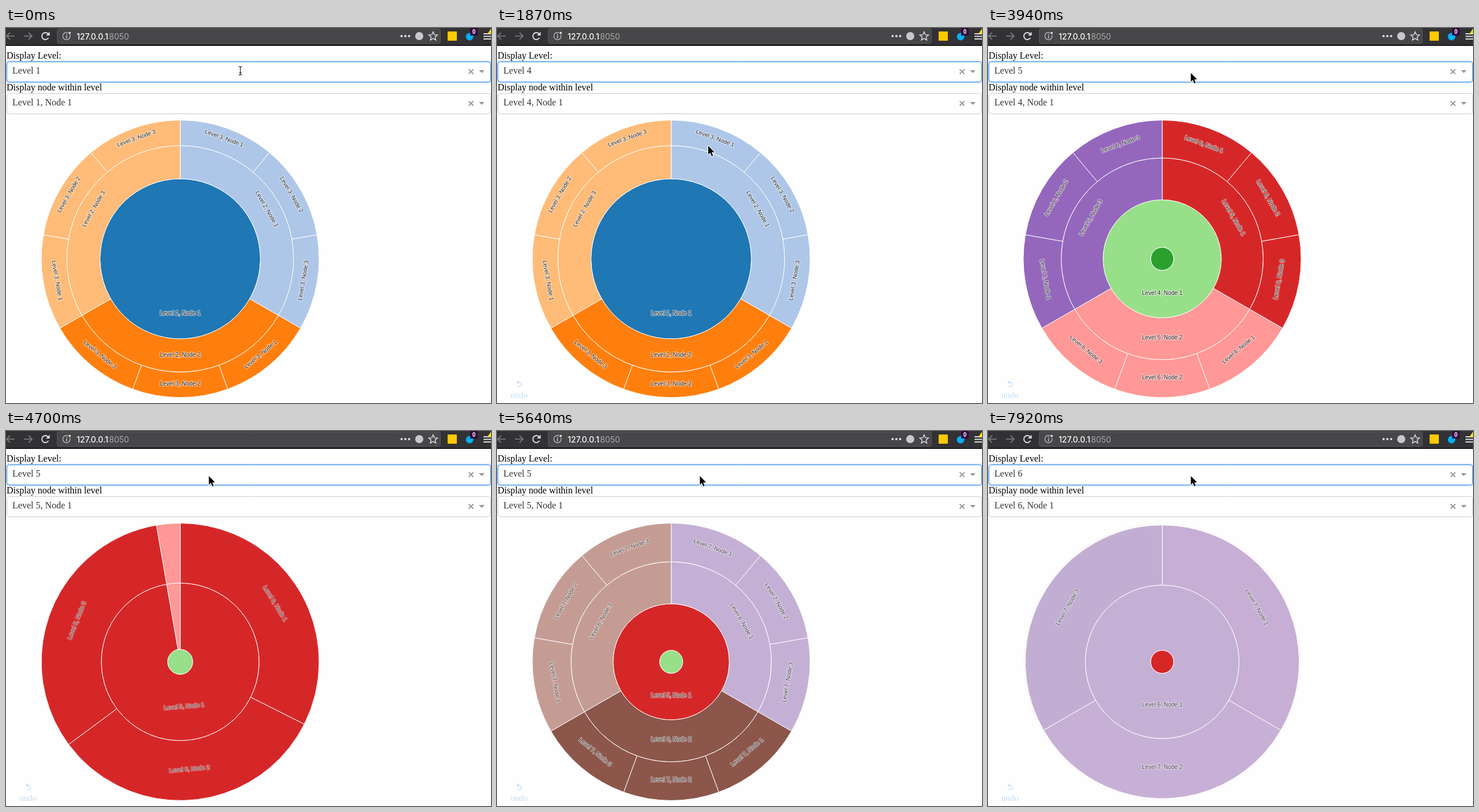
An HTML page with a canvas for the animation above (8000 ms loop, 838x649 px).

```html
<!DOCTYPE html>
<html lang="en">
<head>
<meta charset="utf-8">
<title>Sunburst levels</title>
<style>
  html, body { margin: 0; width: 100%; height: 100%; overflow: hidden; background: #fefefe; }
  canvas { display: block; }
</style>
</head>
<body>
<canvas id="stage" width="838" height="649"></canvas>
<script>
const ctx = document.getElementById('stage').getContext('2d');
const LOOP = 8000, TAU = Math.PI * 2;
const CX = 301, CY = 399.5, RADIUS = 240;
const SERIF = '"Liberation Serif", Times, serif';
const SANS = '"Liberation Sans", Arial, sans-serif';

// Own colours of the first three nodes of each level
const COLORS = {
  1: ['#1f77b4'],
  2: ['#aec7e8', '#ff7f0e', '#ffbb78'],
  3: ['#2ca02c'],
  4: ['#98df8a'],
  5: ['#d62728', '#ff9896', '#9467bd'],
  6: ['#c5b0d5', '#8c564b', '#c49c94'],
  7: ['#e377c2', '#f7b6d2', '#7f7f7f']
};

const mix = (a, b, e) => a + (b - a) * e;
const clamp = (v, lo, hi) => Math.max(lo, Math.min(hi, v));
const cubic = p => p < 0.5 ? 4 * p ** 3 : 1 - 4 * (1 - p) ** 3;
const zoom = (t, start) => cubic(clamp((t - start) / 750, 0, 1));
// Value of the last [time, value] step that has been reached
const pick = (t, steps) => steps.filter(s => t >= s[0]).pop()[1];

function mixColor(a, b, e) {
  const part = (c, i) => parseInt(c.slice(1 + 2 * i, 3 + 2 * i), 16);
  return `rgb(${[0, 1, 2].map(i => Math.round(mix(part(a, i), part(b, i), e)))})`;
}

function text(str, x, y, font, color, align = 'left') {
  ctx.font = font;
  ctx.fillStyle = color;
  ctx.textAlign = align;
  ctx.fillText(str, x, y);
}

function rect(x, y, w, h, color) {
  ctx.fillStyle = color;
  ctx.fillRect(x, y, w, h);
}

function shape(x, y, w, h, radius, fill, stroke) {
  ctx.beginPath();
  ctx.roundRect(x, y, w, h, radius);
  if (fill) { ctx.fillStyle = fill; ctx.fill(); }
  if (stroke) { ctx.strokeStyle = stroke; ctx.lineWidth = 1; ctx.stroke(); }
}

function disc(x, y, r, color) {
  ctx.beginPath();
  ctx.arc(x, y, r, 0, TAU);
  ctx.fillStyle = color;
  ctx.fill();
}

function trace(points, close) {
  ctx.beginPath();
  points.forEach(([x, y]) => ctx.lineTo(x, y));
  if (close) ctx.closePath();
}

function line(points, color, width) {
  trace(points);
  ctx.strokeStyle = color;
  ctx.lineWidth = width;
  ctx.stroke();
}

// ---- Browser bar ----
function drawToolbar() {
  rect(0, 0, 838, 31, '#323234');
  rect(0, 29.5, 838, 1.5, '#0e0e10');
  shape(88.5, 1.5, 662, 25, 3, '#474749', '#5a5a5c');
  const dim = '#77777a', light = '#dcdcde';
  line([[15, 14], [1, 14]], dim, 1.8);
  line([[7, 8], [1, 14], [7, 20]], dim, 1.8);
  line([[31, 14], [45, 14]], dim, 1.8);
  line([[39, 8], [45, 14], [39, 20]], dim, 1.8);

  ctx.beginPath();
  ctx.arc(68, 14, 6, 0.5, TAU - 0.7);
  ctx.strokeStyle = light;
  ctx.lineWidth = 2;
  ctx.stroke();
  trace([[75.5, 6.5], [75.5, 13], [69, 13]], true);
  ctx.fillStyle = light;
  ctx.fill();

  ctx.beginPath();
  ctx.arc(104.5, 14, 6.3, 0, TAU);
  ctx.strokeStyle = '#c4c4c6';
  ctx.lineWidth = 1.2;
  ctx.stroke();
  rect(103.8, 13, 1.6, 5, '#c4c4c6');
  rect(103.8, 10, 1.6, 1.8, '#c4c4c6');
  disc(110, 8.5, 3, '#474749');
  disc(110, 8.5, 2, light);

  text('127.0.0.1', 122, 20, '500 14px Inter, sans-serif', '#f9f9fa');
  text(':8050', 174, 20, '14px Inter, sans-serif', '#a9a9ab');

  [683.5, 690, 696.5].forEach(x => disc(x, 14, 2, light));
  disc(714, 14, 7, '#c8c8ca');
  const star = Array.from({ length: 10 }, (_, i) => {
    const a = i * Math.PI / 5, r = i % 2 ? 3.6 : 8;
    return [738 + r * Math.sin(a), 14.5 - r * Math.cos(a)];
  });
  trace(star, true);
  ctx.strokeStyle = light;
  ctx.lineWidth = 1.4;
  ctx.stroke();

  shape(763, 6, 16, 16, 1, '#ffc800');
  disc(801, 15, 6.5, '#00aef0');
  shape(802, 0, 13, 13, 1, '#33063f');
  text('0', 808.5, 10, `bold 10px ${SANS}`, '#fff', 'center');
  [9, 13.5, 18].forEach(y => rect(825, y, 13, 2, light));
  trace([[838, 1], [838, 10], [832, 10]], true);
  ctx.fillStyle = '#ffe000';
  ctx.fill();
}

// ---- Form ----
function drawControl(top, value, focused, open) {
  if (focused) shape(-1, top - 3, 841, 42, 6, 'rgba(0,126,255,.1)');
  shape(1.5, top + 0.5, 836, 35, open ? [4, 4, 0, 0] : 4, '#fff', focused ? '#1079e6' : '#ccc');
  text(value, 11, top + 21, `16px ${SERIF}`, '#333');
  const y = top + 17.5;
  line([[799.5, y - 4], [807.5, y + 4]], '#999', 2);
  line([[807.5, y - 4], [799.5, y + 4]], '#999', 2);
  const d = open ? -2.5 : 2.5;
  trace([[817, y - d], [827, y - d], [822, y + d]], true);
  ctx.fillStyle = '#999';
  ctx.fill();
}

function drawMenu({ selected, active, scroll }) {
  shape(1.5, 93.5, 836, 199, [0, 0, 4, 4], '#fff', '#ccc');
  rect(2, 93, 835, 1, '#e6e6e6');
  ctx.save();
  ctx.beginPath();
  ctx.rect(2, 94, 835, 198);
  ctx.clip();
  for (let level = 1; level <= 10; level++) {
    const y = 94 + (level - 1) * 35 - scroll;
    if (level === active) rect(2, y, 820, 35, '#e5f2ff');
    text(`Level ${level}`, 10, y + 22, `${level === selected ? 'bold ' : ''}16px ${SERIF}`, '#000');
  }
  rect(822, 94, 15, 198, '#fafafa');
  rect(822, 94, 1, 198, '#e4e4e4');
  shape(826, 95 + scroll * 200 / 350, 8, 114, 4, '#c2c2c2');
  ctx.restore();
}

function menuAt(t, mouse) {
  if (t >= 120 && t < 1870) {
    return { selected: 1, active: clamp(Math.floor((mouse.y - 94) / 35) + 1, 1, 6), scroll: 0 };
  }
  if (t >= 3250 && t < 3940) return { selected: 4, active: t < 3670 ? 4 : 5, scroll: 0 };
  if (t >= 6120 && t < 6900) {
    const down = t >= 6420;
    return { selected: 5, active: down ? 6 : 5, scroll: down ? 10 : 0 };
  }
  return null;
}

function drawUndo() {
  const color = '#c6ddf5';
  ctx.beginPath();
  ctx.arc(38.5, 617, 3.7, -Math.PI / 2, Math.PI * 0.75);
  ctx.strokeStyle = color;
  ctx.lineWidth = 1.4;
  ctx.stroke();
  line([[39, 613.3], [35, 613.3]], color, 1.4);
  line([[37.5, 610.8], [34.8, 613.3], [37.5, 616]], color, 1.4);
  text('undo', 38, 640, `15px ${SERIF}`, color, 'center');
}

// ---- Sunburst ----
// The chart stands still during these spans
const HOLDS = [[4000, 4210], [4270, 4560], [5320, 5410], [6900, 7050], [7310, 7490], [7600, 7810]];

function viewAt(time) {
  if (time < 2050) {
    return {
      base: 1, first: 1, last: 3, focus: 1, inner: 0, low: 0, span: 1,
      edge: k => k / 3, alive: k => k <= 3 ? 1 : 0
    };
  }
  const hold = HOLDS.find(([a, b]) => time >= a && time < b);
  const t = hold ? hold[0] : time;
  const zoom5 = zoom(t, 4065), grow7 = zoom(t, 4880);
  const zoom6 = zoom(t, 6950), grow8 = zoom(t, 7762);
  const part = (k, n) => Math.min(1, k / n);
  const edge = k => mix(mix(part(k, 6), part(k, 7), grow7), part(k, 8), grow8);
  return {
    base: 4, first: 3, last: 8, inner: 20, edge,
    focus: pick(time, [[0, 4], [4210, 5], [7050, 6]]),
    low: mix(mix(edge(3), edge(4), zoom5), edge(5), zoom6),
    span: mix(mix(1, 1 / 3, zoom5), 1 / 9, zoom6),
    alive: k => k <= 6 ? 1 : k === 7 ? grow7 : k === 8 ? grow8 : 0
  };
}

function drawArc(r0, r1, a0, a1, fill) {
  const turn = -Math.PI / 2;
  ctx.beginPath();
  if (a1 - a0 > TAU - 1e-6) {
    ctx.arc(CX, CY, r1, 0, TAU);
    if (r0 > 0) {
      ctx.moveTo(CX + r0, CY);
      ctx.arc(CX, CY, r0, 0, TAU, true);
    }
  } else {
    ctx.arc(CX, CY, r1, a0 + turn, a1 + turn);
    ctx.arc(CX, CY, r0, a1 + turn, a0 + turn, true);
    ctx.closePath();
  }
  ctx.fillStyle = fill;
  ctx.fill();
  ctx.strokeStyle = '#fff';
  ctx.lineWidth = 1;
  ctx.stroke();
}

function drawLabel(str, angle, r, alpha) {
  const flipped = Math.cos(angle) < -1e-6;
  ctx.save();
  ctx.globalAlpha = alpha;
  ctx.translate(CX + r * Math.sin(angle), CY - r * Math.cos(angle));
  ctx.rotate(flipped ? angle + Math.PI : angle);
  ctx.font = `10px ${SANS}`;
  ctx.textAlign = 'center';
  ctx.lineJoin = 'round';
  ctx.strokeStyle = 'rgba(255,255,255,.5)';
  ctx.lineWidth = 2;
  ctx.shadowColor = 'rgba(255,255,255,.8)';
  ctx.shadowBlur = 2;
  ctx.strokeText(str, 0, 0);
  ctx.shadowBlur = 0;
  ctx.fillStyle = '#222';
  ctx.fillText(str, 0, 0);
  ctx.restore();
}

function drawChart(t) {
  const v = viewAt(t);
  const low = Math.sqrt(v.low);
  const radius = y => Math.max(0, v.inner + (RADIUS - v.inner) * (Math.sqrt(y) - low) / (1 - low));
  const angle = x => clamp(x / v.span, 0, 1) * TAU;
  const ink = pick(t, [[0, 1], [4210, 0.72], [5640, 0.85], [5940, 1], [7050, 0.8]]);
  const labels = [];

  for (let k = v.first; k <= v.last; k++) {
    const alpha = v.alive(k);
    const y0 = v.edge(k - 1), y1 = v.edge(k);
    const r0 = radius(y0), r1 = radius(y1);
    if (!alpha || r1 < 0.5) continue;
    const depth = Math.max(0, k - v.base), width = 3 ** -depth;
    for (let i = 0; i < Math.min(9, 3 ** depth); i++) {
      const a0 = angle(i * width), a1 = angle((i + 1) * width);
      if (a1 - a0 < 1e-4) continue;
      const own = i < 3 ? v.alive(k + 1) : 0;
      const parent = depth ? COLORS[k - 1][Math.floor(i / 3)] : COLORS[k][0];
      const color = own ? mixColor(parent, COLORS[k][i], own) : parent;
      ctx.globalAlpha = alpha;
      drawArc(r0, r1, a0, a1, color);
      const r = radius((y0 + y1) / 2);
      if (k >= v.focus && (a1 - a0) * r > 60 && r1 - r0 > 12) {
        labels.push([`Level ${k}, Node ${i % 3 + 1}`, (a0 + a1) / 2, r, alpha * ink]);
      }
    }
  }
  ctx.globalAlpha = 1;
  labels.forEach(args => drawLabel(...args));
}

// ---- Pointer ----
const PATH = [
  [0, 405, 74], [510, 405, 74], [750, 369.5, 186], [1040, 365, 204], [2510, 365, 204],
  [2560, 365.5, 179], [2860, 351, 44], [3020, 350.5, 78], [LOOP, 350.5, 78]
];

function mouseAt(t) {
  const i = PATH.findIndex(p => t < p[0]);
  const [t0, x0, y0] = PATH[i - 1], [t1, x1, y1] = PATH[i];
  const e = (t - t0) / (t1 - t0);
  return { x: mix(x0, x1, e), y: mix(y0, y1, e), beam: t < 1000 && mix(y0, y1, e) < 93 };
}

function drawMouse({ x, y, beam }) {
  ctx.save();
  ctx.translate(x, y);
  if (beam) {
    const parts = [[[0, -6], [0, 6]], [[-3, -7.5], [-1, -7], [0, -6], [1, -7], [3, -7.5]],
      [[-3, 7.5], [-1, 7], [0, 6], [1, 7], [3, 7.5]], [[-2, 3], [2, 3]]];
    parts.forEach(p => line(p, '#fff', 2.6));
    parts.forEach(p => line(p, '#111', 1.1));
  } else {
    trace([[0, 0], [0, 15], [3.4, 11.8], [6, 17.8], [8.3, 16.8], [5.8, 11], [10.6, 10.8]], true);
    ctx.lineJoin = 'round';
    ctx.strokeStyle = '#fff';
    ctx.lineWidth = 2;
    ctx.stroke();
    ctx.fillStyle = '#000';
    ctx.fill();
  }
  ctx.restore();
}

function draw(t) {
  const mouse = mouseAt(t), menu = menuAt(t, mouse);
  const level = pick(t, [[0, 1], [1870, 4], [3940, 5], [6900, 6]]);
  const node = pick(t, [[0, 1], [1870, 4], [4000, 5], [7050, 6]]);

  rect(0, 0, 838, 649, '#fefefe');
  drawChart(t);
  drawControl(113, `Level ${node}, Node 1`, false, false);
  drawControl(58, `Level ${level}`, !menu, !!menu);
  text('Display Level:', 1, 53, `16px ${SERIF}`, '#000');
  text('Display node within level', 1, 108, `16px ${SERIF}`, '#000');
  if (menu) drawMenu(menu);
  if (t >= 1270 && t < 1870) rect(12, 67, 1, 16, '#000');
  if (t >= 1870) drawUndo();
  drawToolbar();
  drawMouse(mouse);
}

const begin = performance.now();
function frame() {
  draw((performance.now() - begin) % LOOP);
  requestAnimationFrame(frame);
}
frame();
</script>
</body>
</html>
```
